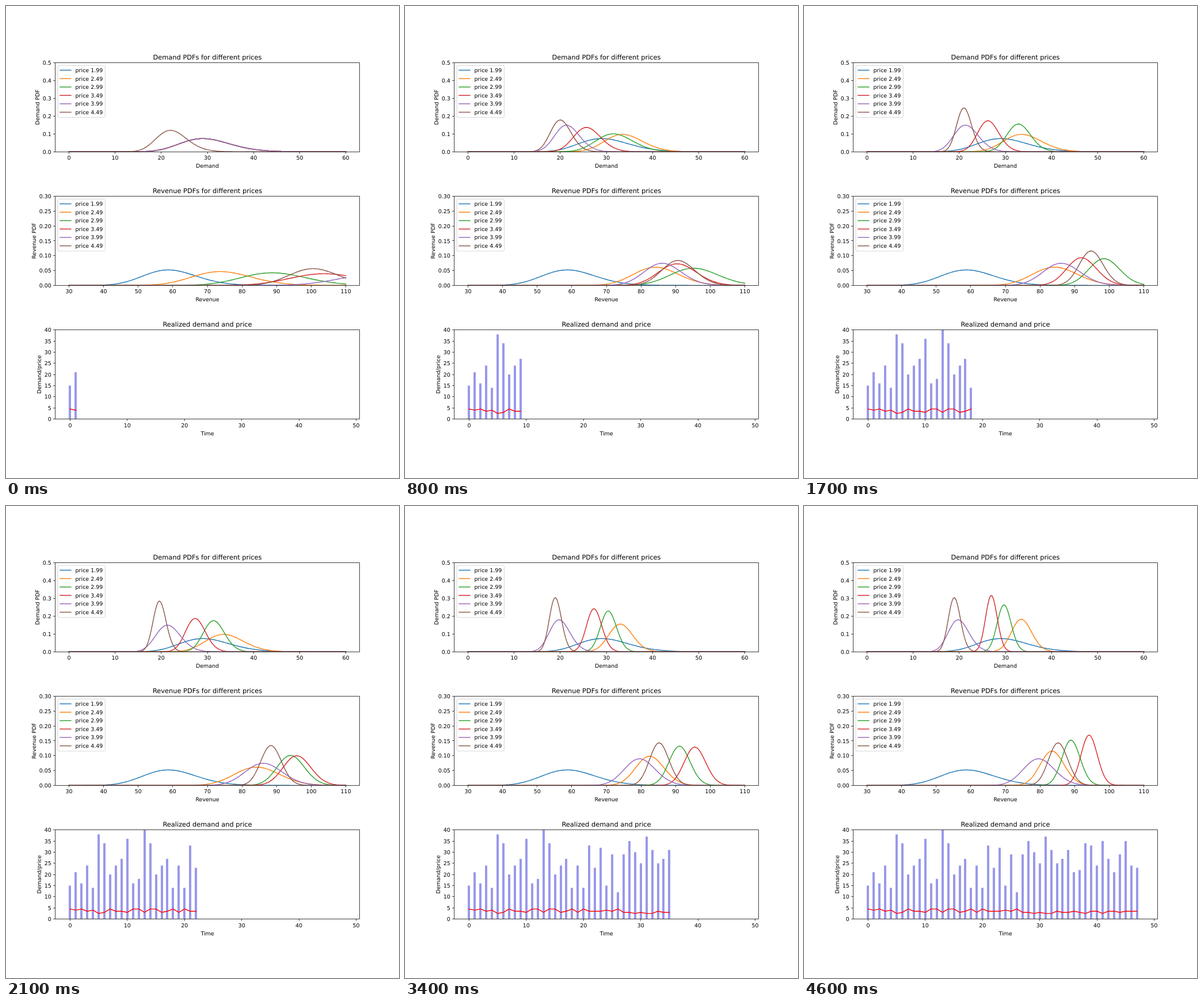
Recreate the animation shown at these times as an HTML page. Size 683 by 820 pixels, loop 4700 ms.

```html
<!DOCTYPE html>
<html lang="en">
<head>
<meta charset="utf-8">
<title>Demand, revenue and price</title>
<style>
html, body { margin: 0; width: 100%; height: 100%; overflow: hidden; background: #fff; }
svg { display: block; }
text { font: 9.486px "DejaVu Sans", sans-serif; text-rendering: geometricPrecision; }
.title { font-size: 11.383px; }
.mid { text-anchor: middle; }
.end { text-anchor: end; }
.axis { fill: none; stroke: #000; stroke-width: .76; }
.curve { fill: none; stroke-width: 1.42; stroke-linejoin: round; stroke-linecap: square; }
</style>
</head>
<body>
<svg id="stage" width="683" height="820" viewBox="0 0 683 820"></svg>
<script>
const STEP = 100, FRAMES = 47, SAMPLES = 200;
const LEFT = 85.375, WIDTH = 529.325, HEIGHT = 154.78;
const COLORS = ['#1f77b4', '#ff7f0e', '#2ca02c', '#d62728', '#9467bd', '#8c564b'];
const PRICES = COLORS.map((_, i) => 1.99 + i / 2);
const CHOICES = [...'545341253325525523525333435221211322321331332333'].map(Number);
const DEMANDS = [
  15, 21, 16, 24, 14, 38, 34, 20, 24, 27, 36, 16, 18, 41, 34, 20,
  24, 27, 14, 24, 14, 33, 23, 32, 15, 29, 12, 29, 35, 30, 25, 37,
  31, 25, 27, 31, 21, 22, 34, 33, 24, 35, 27, 21, 29, 35, 24, 23
];
const stage = document.getElementById('stage');

function add(parent, tag, attrs, text) {
  const node = document.createElementNS('http://www.w3.org/2000/svg', tag);
  for (const key in attrs) node.setAttribute(key, attrs[key]);
  if (text !== undefined) node.textContent = text;
  return parent.appendChild(node);
}

const snap = v => Math.floor(v) + .5;
const range = (from, to, step) =>
  Array.from({ length: Math.round((to - from) / step) + 1 }, (_, i) => from + i * step);
const pathOf = points =>
  'M' + points.map(([x, y]) => x.toFixed(2) + ' ' + y.toFixed(2)).join('L');

function makePanel({ top, title, xLabel, yLabel, yLabelX, x0, x1, yMax, xTicks, yTicks, digits }) {
  const bottom = top + HEIGHT;
  const sx = v => LEFT + (v - x0) / (x1 - x0) * WIDTH;
  const sy = v => bottom - v / yMax * HEIGHT;
  const clipId = 'clip' + Math.round(top);
  const clip = add(stage, 'clipPath', { id: clipId });
  add(clip, 'rect', { x: LEFT, y: top, width: WIDTH, height: HEIGHT });
  const plot = add(stage, 'g', { 'clip-path': `url(#${clipId})` });

  const l = snap(LEFT), r = snap(LEFT + WIDTH), t = snap(top), b = snap(bottom);
  let axis = `M${l} ${t}H${r}V${b}H${l}Z`;
  for (const v of xTicks) {
    axis += `M${snap(sx(v))} ${b}v3.32`;
    add(stage, 'text', { class: 'mid', x: sx(v), y: bottom + 14 }, v);
  }
  for (const v of yTicks) {
    axis += `M${l} ${snap(sy(v))}h-3.32`;
    add(stage, 'text', { class: 'end', x: 78.8, y: sy(v) + 3.6 }, v.toFixed(digits));
  }
  add(stage, 'path', { class: 'axis', d: axis });

  const cx = LEFT + WIDTH / 2, cy = top + HEIGHT / 2;
  add(stage, 'text', { class: 'mid title', x: cx, y: top - 5.6 }, title);
  add(stage, 'text', { class: 'mid', x: cx, y: bottom + 28 }, xLabel);
  add(stage, 'text', { class: 'mid', transform: `translate(${yLabelX} ${cy}) rotate(-90)` }, yLabel);
  return { plot, sx, sy, top };
}

function addCurves(panel, from, to) {
  panel.xs = range(from, to, (to - from) / (SAMPLES - 1));
  panel.curves = COLORS.map(stroke => add(panel.plot, 'path', { class: 'curve', stroke }));
  const y = panel.top + 4.9;
  add(stage, 'rect', {
    x: 90.2, y, width: 82.2, height: 90.3, rx: 1.9,
    fill: '#fff', 'fill-opacity': .8, stroke: '#ccc', 'stroke-opacity': .8, 'stroke-width': .95
  });
  COLORS.forEach((stroke, i) => {
    const rowY = y + 8.2 + i * 14.6;
    add(stage, 'path', { class: 'curve', stroke, d: `M93.9 ${rowY}H112.9` });
    add(stage, 'text', { x: 120.6, y: rowY + 3.4 }, 'price ' + PRICES[i].toFixed(2));
  });
}

const demand = makePanel({
  top: 98.4, title: 'Demand PDFs for different prices', xLabel: 'Demand',
  yLabel: 'Demand PDF', yLabelX: 57.8, x0: -3, x1: 63, yMax: .5,
  xTicks: range(0, 60, 10), yTicks: range(0, .5, .1), digits: 1
});
addCurves(demand, 0, 60);

const revenue = makePanel({
  top: 330.57, title: 'Revenue PDFs for different prices', xLabel: 'Revenue',
  yLabel: 'Revenue PDF', yLabelX: 51.8, x0: 26, x1: 114, yMax: .3,
  xTicks: range(30, 110, 10), yTicks: range(0, .3, .05), digits: 2
});
addCurves(revenue, 30, 110);

const history = makePanel({
  top: 562.74, title: 'Realized demand and price', xLabel: 'Time',
  yLabel: 'Demand/price', yLabelX: 60.9, x0: -2.62, x1: 50.62, yMax: 40,
  xTicks: range(0, 50, 10), yTicks: range(0, 40, 5), digits: 0
});
const bars = DEMANDS.map((d, i) => add(history.plot, 'rect', {
  x: Math.round(history.sx(i - .2)), y: history.sy(d), width: 4,
  height: history.sy(0) - history.sy(d), fill: '#9999eb'
}));
const priceLine = add(history.plot, 'path', { class: 'curve', stroke: '#f00' });
const pricePoints = CHOICES.map((c, i) => [history.sx(i), history.sy(PRICES[c])]);

// Stirling's series is accurate for the large shapes used here.
const logGamma = a => (a - .5) * Math.log(a) - a + Math.log(2 * Math.PI) / 2 + 1 / (12 * a);

function gammaPdf(x, shape, rate) {
  if (x <= 0) return 0;
  return Math.exp(shape * Math.log(rate) + (shape - 1) * Math.log(x) - rate * x - logGamma(shape));
}

function drawPdf(panel, i, shape, rate) {
  const points = panel.xs.map(x => [panel.sx(x), panel.sy(gammaPdf(x, shape, rate))]);
  panel.curves[i].setAttribute('d', pathOf(points));
}

function render(step) {
  const shapes = PRICES.map(() => 30), rates = PRICES.map(() => 1);
  for (let i = 0; i <= step; i++) {
    shapes[CHOICES[i]] += DEMANDS[i];
    rates[CHOICES[i]]++;
  }
  PRICES.forEach((price, i) => {
    drawPdf(demand, i, shapes[i], rates[i]);
    drawPdf(revenue, i, shapes[i] * price, rates[i]);
  });
  // The newest sale is shown before it enters the estimates.
  bars.forEach((bar, i) => bar.setAttribute('visibility', i <= step + 1 ? 'visible' : 'hidden'));
  priceLine.setAttribute('d', pathOf(pricePoints.slice(0, step + 2)));
}

let start, shown;
function tick(now) {
  start ??= now;
  const step = Math.floor((now - start) / STEP) % FRAMES;
  if (step !== shown) render(shown = step);
  requestAnimationFrame(tick);
}
render(shown = 0);
requestAnimationFrame(tick);
</script>
</body>
</html>
```
